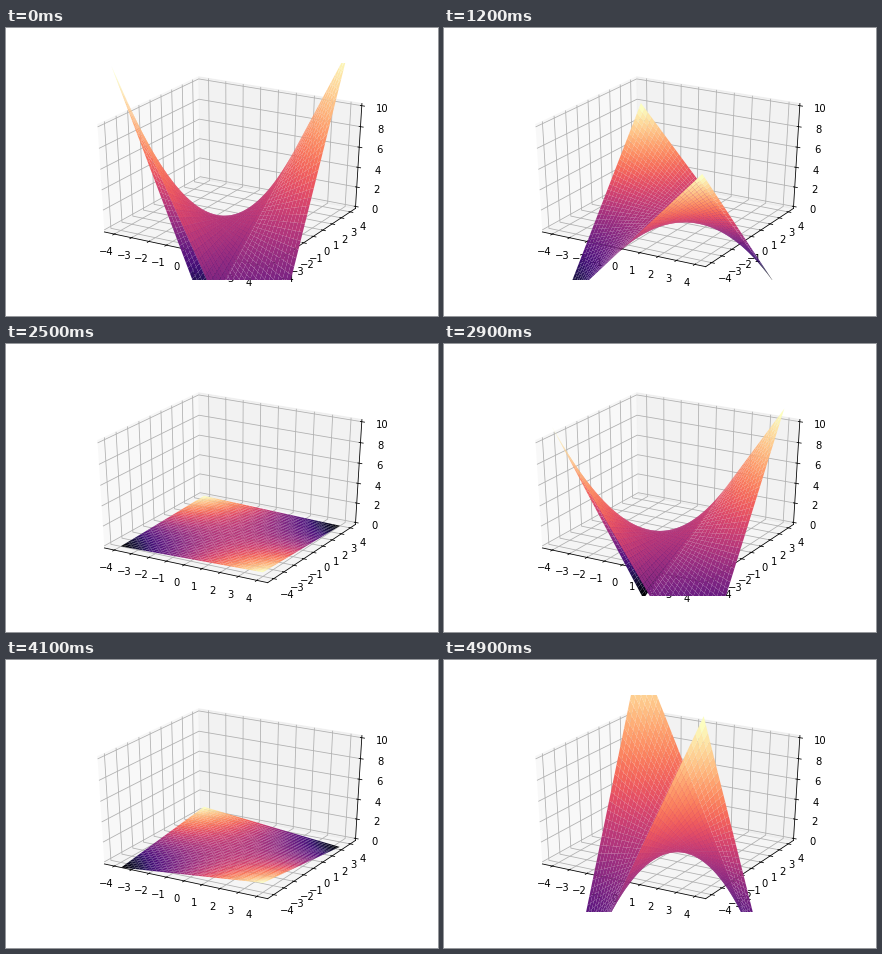
A matplotlib script that plays this animation: 432x288 px, repeating every 5 s.

```python
import numpy as np
import matplotlib.pyplot as plt
from matplotlib.animation import FuncAnimation

FRAMES, INTERVAL = 50, 100
SPEED, PEAK = 0.2, 1.5      # radians per frame, frame of the highest saddle
PAD = 1 / 48                # gap between axis limits and panes


def padded(low, high):
    gap = (high - low) * PAD
    return low - gap, high + gap


fig = plt.figure(figsize=(6, 4), dpi=72, facecolor="white")
fig.subplots_adjust(left=0.125, right=0.9, bottom=0.125, top=0.88)
ax = fig.add_subplot(projection="3d")

# Fill the whole subplot area instead of a centred square.
ax.apply_aspect = lambda position=None: None
ax.set_box_aspect((1, 1, 1), zoom=np.sqrt(3) / 1.8294640721620434)
ax.view_init(elev=30, azim=-60)

side = np.linspace(-4, 4, 41)
x, y = np.meshgrid(side, side)
surface = None


def draw(frame):
    global surface
    if surface is not None:
        surface.remove()
    height = np.cos(SPEED * (frame - PEAK))
    surface = ax.plot_surface(x, y, height * x * y, cmap="magma", linewidth=0)
    ax.set_xlim(padded(-4.4, 4.4))
    ax.set_ylim(padded(-4.4, 4.4))
    ax.set_zlim(padded(0, 10))
    ax.set_xticks(range(-4, 5))
    ax.set_yticks(range(-4, 5))
    ax.set_zticks(range(0, 11, 2))
    return [surface]


anim = FuncAnimation(fig, draw, frames=FRAMES, interval=INTERVAL,
                     init_func=lambda: [], repeat=True, repeat_delay=0)
plt.show()
```
